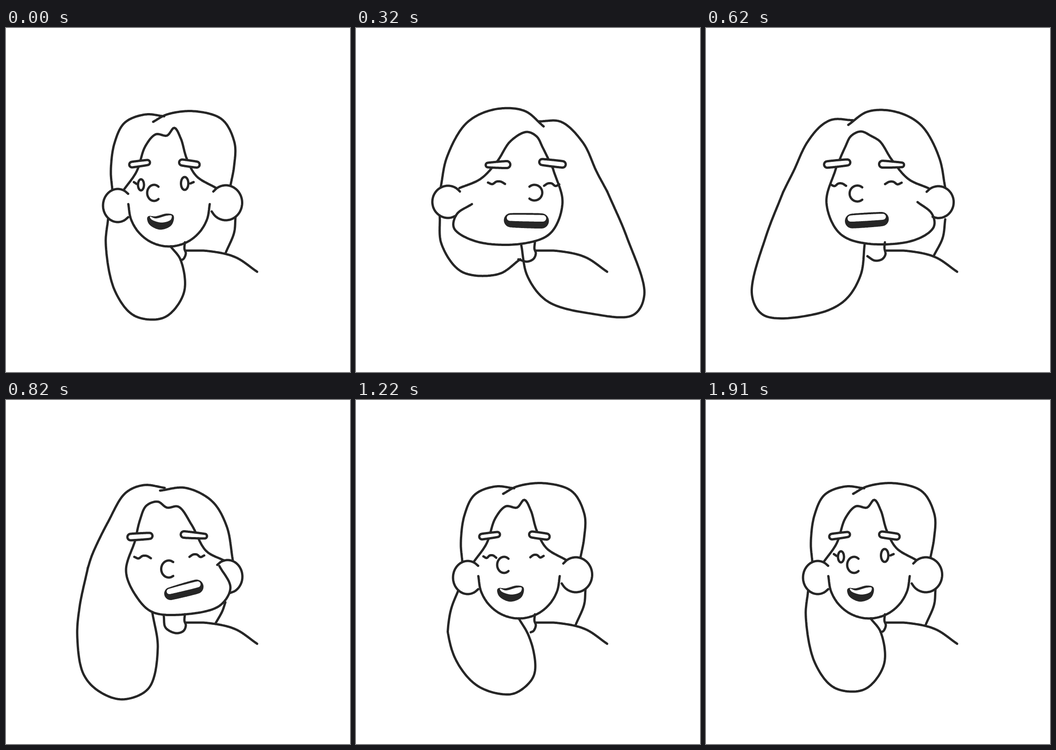
An HTML page that plays this animation: 748x748 px, repeating every 2.48 s.

```html
<!DOCTYPE html>
<html lang="en">
<head>
<meta charset="utf-8">
<title>Head shake</title>
<style>
  html, body { margin: 0; width: 100%; height: 100%; overflow: hidden; background: #fff; }
  svg { display: block; width: 100%; height: 100%; }
  path { fill: none; stroke: #262626; stroke-width: 5; stroke-linecap: round; stroke-linejoin: round; }
  .paper { fill: #fff; }
  .ink { fill: #262626; }
  .teeth { fill: #fff; stroke: none; }
</style>
</head>
<body>
<svg id="stage" viewBox="0 0 748 748"></svg>
<script>
const LOOP = 2480;
const SAMPLES = 120;

// Drawing order, back to front: name, style class, closed outline.
const PARTS = [
  ['back'], ['lobe', 'paper'], ['neck'], ['shoulder'], ['hairL'], ['hairR'],
  ['earL', 'paper'], ['earR', 'paper'], ['fringe'], ['face'],
  ['browL', 'paper', true], ['browR', 'paper', true], ['nose'],
  ['mouth', 'ink', true], ['teeth', 'teeth', true],
  ['eyeL', 'paper', true], ['eyeR', 'paper', true], ['eyeL2', 'paper', true], ['eyeR2', 'paper', true],
  ['lashL'], ['lashR'], ['lashL2'], ['lashR2'], ['lidL'], ['lidR']
];
const CLOSED = new Set(PARTS.filter(p => p[2]).map(p => p[0]));
const FIXED = new Set(['neck', 'shoulder']);

const lerp = (a, b, t) => a + (b - a) * t;
const mixPoint = (p, q, t) => [lerp(p[0], q[0], t), lerp(p[1], q[1], t)];
const dist = (p, q) => Math.hypot(q[0] - p[0], q[1] - p[1]);
const points = text => text.split(' ').map(p => p.split(',').map(Number));

// Shape helpers return a few points that a spline then joins. Angles are in degrees, clockwise.
function arc(x, y, rx, ry, from, to) {
  const steps = Math.ceil(Math.abs(to - from) / 20);
  return Array.from({ length: steps + 1 }, (_, i) => {
    const a = lerp(from, to, i / steps) * Math.PI / 180;
    return [x + rx * Math.cos(a), y + ry * Math.sin(a)];
  });
}

const oval = (x, y, rx, ry) => arc(x, y, rx, ry, 0, 340);

function capsule(x1, y1, r1, x2, y2, r2) {
  const a = Math.atan2(y2 - y1, x2 - x1) * 180 / Math.PI;
  return [
    ...arc(x1, y1, r1, r1, a + 180, a + 270),
    ...arc(x2, y2, r2, r2, a - 90, a + 90),
    ...arc(x1, y1, r1, r1, a + 90, a + 160)
  ];
}

// A laughing mouth with the upper half taken by teeth.
const laugh = (x1, y1, r1, x2, y2, r2) => ({
  mouth: capsule(x1, y1, r1, x2, y2, r2),
  teeth: capsule(x1 - 0.25 * r1, y1 - 0.4 * r1, r1 / 2, x2 + 0.2 * r2, y2 - 0.4 * r2, r2 / 2)
});

const lid = (x, y, w) => [0, 3.5, -2, -2, 3].map((dy, i) => [x + w * i / 4, y + dy]);
const neck = tail => '389,466 388,480 391,490 386,502 ' + tail;
const shoulder = '391,484 440,485 498,498 546,530';

// Centripetal Catmull-Rom segment from b to c.
function segment(a, b, c, d, u) {
  const k = [0];
  [[a, b], [b, c], [c, d]].forEach(([p, q], i) => k.push(k[i] + Math.max(Math.sqrt(dist(p, q)), 0.01)));
  const t = lerp(k[1], k[2], u);
  const at = (p, q, i, j) => mixPoint(p, q, (t - k[i]) / (k[j] - k[i]));
  const ab = at(a, b, 0, 1), bc = at(b, c, 1, 2), cd = at(c, d, 2, 3);
  return at(at(ab, bc, 0, 2), at(bc, cd, 1, 3), 1, 2);
}

// Smooth curve through the points, resampled evenly so that poses can blend.
function curve(shape, closed) {
  const pts = typeof shape === 'string' ? points(shape) : shape;
  const n = pts.length;
  const get = i => closed ? pts[(i + n) % n]
    : i < 0 ? mixPoint(pts[0], pts[1], -1)
    : i >= n ? mixPoint(pts[n - 1], pts[n - 2], -1) : pts[i];
  const fine = [pts[0]];
  for (let i = 0; i < (closed ? n : n - 1); i++)
    for (let s = 1; s <= 16; s++) fine.push(segment(get(i - 1), get(i), get(i + 1), get(i + 2), s / 16));
  const run = [0];
  for (let i = 1; i < fine.length; i++) run.push(run[i - 1] + dist(fine[i - 1], fine[i]));
  const total = run[run.length - 1];
  let j = 1;
  return Array.from({ length: SAMPLES + 1 }, (_, i) => {
    const want = total * i / SAMPLES;
    while (j < run.length - 1 && run[j] < want) j++;
    return mixPoint(fine[j - 1], fine[j], (want - run[j - 1]) / (run[j] - run[j - 1] || 1));
  });
}

function pose(parts) {
  const result = {};
  for (const [name, shape] of Object.entries({ shoulder, ...parts })) result[name] = curve(shape, CLOSED.has(name));
  return result;
}

function mix(a, b, t) {
  const result = {};
  for (const [name] of PARTS) {
    const nearest = (t < 0.5 ? a : b)[name];
    if (a[name] && b[name]) result[name] = a[name].map((p, i) => mixPoint(p, b[name][i], t));
    else if (nearest) result[name] = nearest;
  }
  return result;
}

// Head turned the other way; the far hair then hangs down to the neck.
function flip(source, axis) {
  const result = {};
  for (const name in source)
    result[name] = FIXED.has(name) ? source[name] : source[name].map(([x, y]) => [2 * axis - x, y]);
  result.back = curve('182,408 186,470 230,530 310,535 357,503');
  return result;
}

const rest = pose({
  hairL: '344,192 303,188 258,206 236,250 228,310 231,350',
  hairR: '320,204 350,188 410,181 470,199 497,250 496,300 488,343',
  fringe: '256,352 284,312 303,257 326,231 350,234 366,217 380,240 393,284 414,322 457,348',
  face: arc(354.5, 383, 88.5, 92, 180, 0),
  browL: capsule(274, 297, 6, 307.5, 292.5, 5.5),
  browR: capsule(383, 292.5, 6.5, 414.5, 297, 6.5),
  eyeL: oval(293.5, 341, 6.5, 12), eyeR: oval(388.5, 338, 8, 14),
  lashL: '278,335 284,339', lashR: '401,338 408,335',
  nose: arc(322, 358.5, 15, 17.5, -50, -310),
  earL: arc(243, 386, 32, 36, -45, -315),
  earR: arc(478, 380, 35.5, 38, -140, 150),
  mouth: '310,412 325,412 350,406 362,409 358,427 335,436 313,425',
  teeth: '313,410 325,414 350,408 360,408 358,417 338,423 316,416',
  neck: neck('380,505'),
  lobe: '222,415 217,470 237,572 280,626 345,629 387,575 380,505 358,475',
  back: '499,412 496,445 478,488'
});

const smear = pose({
  hairL: '360,175 270,189 195,226 164,285 175,354',
  hairR: '360,175 450,186 530,222 558,270 548,315 528,348',
  fringe: '203,342 250,311 291,278 328,227 340,219 349,221 385,255 450,300 508,348',
  face: '213,344 208,406 270,451 355,466 440,454 500,407 506,382',
  browL: capsule(241, 299, 8, 295, 290, 9),
  browR: capsule(379, 291.5, 10, 452, 294, 8),
  eyeL2: oval(232, 334, 5.5, 6), eyeL: oval(279.5, 335, 8, 10.5),
  eyeR: oval(407, 335, 7.5, 12), eyeR2: oval(466, 337, 7, 5.5),
  lashL2: '218,332 220,333', lashL: '260,333 266,334', lashR: '421,335 428,335', lashR2: '479,338 483,337',
  nose: '317,343 300,353 304,368 330,369 362,366 368,352 356,342',
  earL: arc(185, 382, 38, 27, -50, -310),
  earR: arc(522, 380, 37, 31, -140, 130),
  ...laugh(297, 426, 18, 422, 415, 18),
  neck: neck('372,508 355,505'),
  lobe: '175,410 158,520 177,615 240,640 315,618 347,555 356,468',
  back: '521,411 517,455 500,496'
});

const swing = pose({
  hairL: '313,203 265,204 217,250 188,312 165,355',
  hairR: '303,214 345,180 410,177 470,206 513,280 527,347',
  fringe: '283,305 305,260 318,236 340,226 375,246 404,290 440,328 486,348',
  face: '283,305 262,380 288,446 350,469 450,464 498,435 492,405 459,383',
  browL: capsule(262, 296.5, 7, 306, 291.5, 6.5),
  browR: capsule(383, 297, 7.5, 424, 298, 5),
  lidL: lid(269, 340, 33), lidR: lid(424, 336, -37),
  nose: arc(323, 358, 17, 17, -50, -310),
  earR: arc(511, 378, 34, 35, -140, 120),
  ...laugh(308, 419.5, 14, 374, 418, 13),
  neck: neck('372,508 353,503'),
  lobe: '165,355 122,455 84,580 108,624 200,621 295,594 338,540 352,470',
  back: '531,410 526,455 505,498'
});

const sway = pose({
  hairL: '345,191 300,185 260,202 222,265 188,335 178,365',
  hairR: '335,197 390,191 448,220 480,275 493,347',
  fringe: '281,305 291,262 305,230 330,221 350,234 375,232 404,272 435,328 474,349',
  face: '281,305 261,372 282,425 318,461 390,466 465,447 488,408 464,361',
  browL: capsule(271, 298, 7, 312, 295.5, 6.5),
  browR: capsule(387, 292.5, 7, 432, 296, 5),
  lidL: lid(279, 341, 36), lidR: lid(431, 338, -32),
  nose: arc(354, 367.5, 16.5, 18.5, -55, -305),
  earR: arc(482, 384, 32, 36, -135, 80),
  ...laugh(358, 421, 11.5, 414, 406, 13),
  neck: neck('370,507 347,495 343,469'),
  lobe: '178,365 160,450 155,515 168,595 200,632 253,651 310,627 330,540 318,461',
  back: '477,440 470,460 456,485'
});

const settle = pose({
  hairL: '353,194 303,186 262,206 225,270 181,375',
  hairR: '345,191 395,179 455,192 500,253 503,305 494,355',
  fringe: '279,302 305,252 333,228 350,229 360,225 373,229 393,268 416,312 456,346',
  face: '279,302 258,355 240,410 272,453 355,474 420,445 441,390 446,369',
  browL: capsule(276, 295, 5, 303, 287, 8),
  browR: capsule(383, 297, 6.5, 418, 300, 7),
  lidL: lid(273, 338, 31), lidR: lid(411, 339, -35),
  nose: arc(325, 362, 15, 15.5, -45, -310),
  earL: arc(240, 381, 31.5, 30, -60, -270),
  earR: arc(471, 383.5, 32, 34.5, -130, 150),
  ...laugh(323, 418, 15, 366, 420, 15),
  neck: neck('375,507 365,506'),
  lobe: '181,375 174,460 193,550 240,610 305,644 345,648 389,616 384,555 350,475',
  back: '496,405 494,445 476,489'
});

const { eyeL, eyeR, lashL, lashR, ...eyeless } = rest;
const blink = { ...eyeless, lidL: curve(lid(277, 340, 28)), lidR: curve(lid(408, 339, -29)) };

// The lobe lags behind the head while its upper end stays at the ear.
const trailing = (base, t) => ({
  ...base,
  lobe: base.lobe.map((p, i) => mixPoint(p, settle.lobe[i], t * Math.min(1, i / 25)))
});

// Each pose holds until the next start time.
const TIMELINE = [
  [0, rest],
  [170, mix(blink, settle, 0.3)],
  [260, smear],
  [290, flip(mix(smear, swing, 0.5), 355.5)],
  [320, flip(swing, 355.5)],
  [420, mix(smear, swing, 0.5)],
  [520, swing],
  [620, mix(swing, sway, 0.2)],
  [720, flip(mix(swing, sway, 0.5), 357)],
  [820, sway],
  [920, mix(sway, settle, 0.5)],
  [1020, settle],
  [1120, mix(settle, blink, 0.5)],
  [1220, trailing(blink, 0.5)],
  [1320, trailing(rest, 0.25)],
  [1420, rest],
  [1520, blink],
  [1650, rest],
  [1810, blink],
  [1910, rest]
];

const stage = document.getElementById('stage');
const paths = PARTS.map(([name, style]) => {
  const path = document.createElementNS('http://www.w3.org/2000/svg', 'path');
  if (style) path.setAttribute('class', style);
  stage.append(path);
  return [name, path];
});

const toPath = (pts, closed) => 'M' + pts.map(p => p.map(v => v.toFixed(1)).join(' ')).join('L') + (closed ? 'Z' : '');

let shown;
function draw(time) {
  const current = TIMELINE.filter(([start]) => start <= time).pop()[1];
  if (current === shown) return;
  shown = current;
  for (const [name, path] of paths)
    path.setAttribute('d', current[name] ? toPath(current[name], CLOSED.has(name)) : '');
}

const begin = performance.now();
function tick() {
  draw((performance.now() - begin) % LOOP);
  requestAnimationFrame(tick);
}
tick();
</script>
</body>
</html>
```
